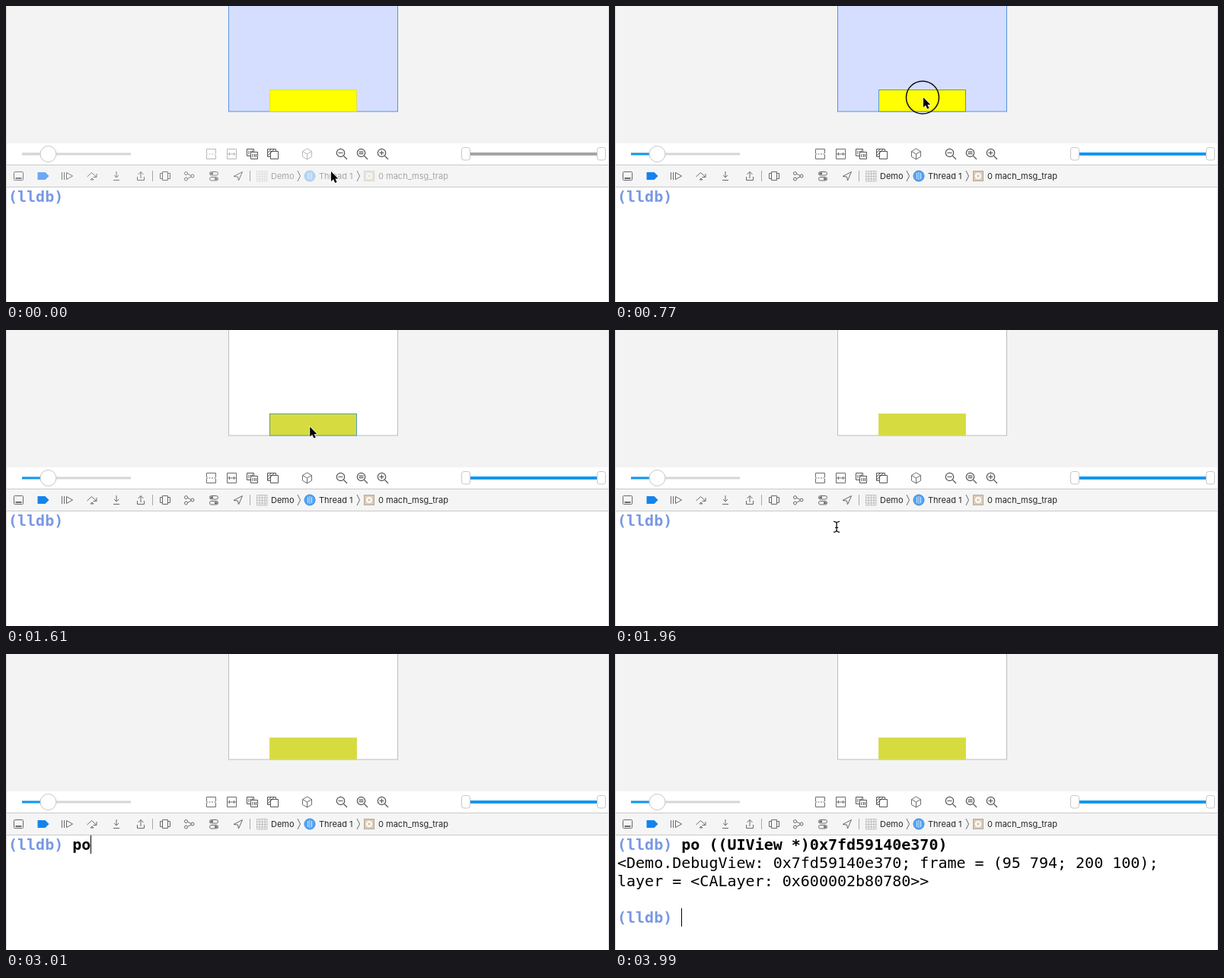
Animation of 792 by 390 pixels, one loop 4270 ms. Source, as an HTML page:

```html
<!DOCTYPE html>
<html lang="en">
<head>
<meta charset="utf-8">
<title>View debugger</title>
<style>
html, body { margin: 0; width: 100%; height: 100%; overflow: hidden; background: #fff; }
svg { display: block; --icon: #828282; --soft: #b8b8b8; --label: #a6a6a6; --tag: #6ea8f5; --fill: #d6d6d6; --range: #a4a4a4; --fade: .4; }
svg.active { --icon: #686868; --soft: #6c6c6c; --label: #272727; --tag: #1583ee; --fill: #1497ee; --range: #1497ee; --fade: 1; }
.icon { fill: none; stroke: var(--icon); }
.soft { fill: none; stroke: var(--soft); }
.dark { fill: none; stroke: #555; }
.knob { fill: #fff; stroke: #c6c6c6; }
.label { font: 11px Inter, sans-serif; fill: var(--label); }
.console { font: 20px "DejaVu Sans Mono", monospace; white-space: pre; }
.bold { font-weight: bold; }
.prompt { fill: #7898e4; font-weight: bold; }
</style>
</head>
<body>
<svg id="stage" width="792" height="390" viewBox="0 0 792 390">
  <rect width="792" height="181" fill="#f3f3f3"/>
  <rect id="screen" x="292.5" y="-5" width="222" height="144"/>
  <rect id="view" x="346.5" y="110.5" width="114" height="28.5"/>

  <!-- canvas controls -->
  <path d="M21 195H164" stroke="#d6d6d6" stroke-width="3"/>
  <path d="M21 195H50" stroke="var(--fill)" stroke-width="3"/>
  <circle class="knob" cx="55.5" cy="195" r="10.5"/>
  <path d="M608 195H778" stroke="var(--range)" stroke-width="4"/>
  <rect class="knob" x="598.5" y="186.5" width="11" height="16.5" rx="3"/>
  <rect class="knob" x="776.5" y="186.5" width="11" height="16.5" rx="3"/>
  <g class="soft">
    <path d="M263.5 194V188.5H275.5V194M263.5 196V201.500H275.5V196"/>
    <path d="M263 195H276" stroke-dasharray="2 1.5"/>
    <path d="M290.5 188.500H302.500V201.500H290.500ZM291 195H302M293.500 193V197M299.500 193V197"/>
    <path d="M395.500 188L401.500 191.500V198.500L395.500 202L389.500 198.500V191.500ZM389.500 191.500L395.500 195L401.500 191.500M395.500 195V202"/>
  </g>
  <g class="dark">
    <path d="M321 197.500H316.500V188.500H325.500V192M319 191V195M321.500 191V195M323.500 190V192"/>
    <path d="M321.500 192.500H330.500V201.500H321.500ZM324 195V199M326.500 195V199M328.500 195V199"/>
    <path d="M347.500 191.500H357.500V201.500H347.500ZM347 198.500H343.500V188.500H354.500V191M344 193L348 189M344 197L352 189"/>
    <g id="lenses" stroke-width="1.2"></g>
  </g>

  <!-- debug bar -->
  <rect y="209" width="792" height="30" fill="#c9c9c9"/>
  <rect y="210" width="792" height="28" fill="#f5f5f5"/>
  <path d="M192.500 217V231M320.500 217V231" stroke="#a8a8a8"/>
  <path d="M41.500 219H51.500L56.500 224L51.500 229H41.500Z" fill="var(--tag)"/>
  <g class="icon">
    <rect x="10.500" y="218.500" width="12" height="11" rx="1"/>
    <path d="M12.500 227H20.500" stroke-width="2"/>
    <path d="M73.500 219V229M76.500 219V229M79.500 219.500V228.500L87.500 224Z"/>
    <path d="M106.500 225L112.500 219.500L118.500 225M119 221V225.500H114.500M111 229L113 227L115 229Z"/>
    <path d="M145 218V226M142 223L145 226L148 223M141 229.500H149"/>
    <path d="M177 227V218.500M173.500 222L177 218.500L180.500 222M172.500 225V229.500H181.500V225"/>
    <path d="M205.500 218.500H212.500V229.500H205.500ZM205 220.500H202.500V227.500H205M213 220.500H215.500V227.500H213"/>
    <circle cx="236.500" cy="220.500" r="2"/><circle cx="245" cy="224" r="2"/><circle cx="236.500" cy="228" r="2"/>
    <path d="M238.500 221L243 223.500M238.500 227.500L243 225"/>
    <rect x="267.500" y="218.500" width="11" height="4.500" rx="2.200"/>
    <rect x="267.500" y="225.500" width="11" height="4.500" rx="2.200"/>
    <path d="M268.500 220.750H272M274 227.750H277.500" stroke-width="2.500"/>
    <path d="M299 224.500L310.500 218.500L305.500 230L304.500 225Z"/>
    <path d="M383 217L386.500 224L383 231M461 217L464.500 224L461 231"/>
  </g>
  <g opacity="var(--fade)" style="opacity:var(--fade)">
    <path d="M329.500 217.500H343V231H329.500ZM333 217V231M336.500 217V231M340 217V231M329 221H343M329 224.500H343M329 228H343" fill="#f1f1f1" stroke="#b9b9b9" stroke-width=".8"/>
    <circle cx="399" cy="224" r="7" fill="#55a5f3" stroke="#3989df"/>
    <path d="M396.500 220V228M399 219V229M401.500 220V228" stroke="#cfe6ff"/>
    <rect x="470.500" y="217.500" width="13" height="13" fill="#dccbb8" stroke="#b8a796"/>
    <circle cx="477" cy="224" r="3" fill="none" stroke="#fff" stroke-width="2"/>
  </g>
  <text class="label" x="348" y="228">Demo</text>
  <text class="label" x="411" y="228">Thread 1</text>
  <text class="label" x="489" y="228">0 mach_msg_trap</text>

  <!-- console -->
  <g class="console">
    <text x="3" y="258"><tspan class="prompt">(lldb) </tspan><tspan class="bold" id="command"></tspan></text>
    <g id="output">
      <text x="3" y="282">&lt;Demo.DebugView: 0x7fd59140e370; frame = (95 794; 200 100);</text>
      <text x="3" y="306">    layer = &lt;CALayer: 0x600002b80780&gt;&gt;</text>
      <text x="3" y="354" class="prompt">(lldb)</text>
    </g>
  </g>
  <rect id="caret" width="1" height="24"/>
  <path d="M.5 0V390M791.500 0V390" stroke="#dcdcdc"/>

  <circle id="ring" fill="none" stroke="#111" stroke-width="1.500"/>
  <path id="arrow" d="M0 0V13L3 10.300L5.200 15L7.600 13.900L5.400 9.400H9.200Z" stroke="#fff" stroke-width="1.200" paint-order="stroke"/>
  <g id="beam" fill="none">
    <path id="beamShape" d="M-4 -7Q0 -7 0 -4Q0 -7 4 -7M0 -4V4M-4 7Q0 7 0 4Q0 7 4 7M-2 1H2" stroke="#fff" stroke-width="3"/>
    <use href="#beamShape" style="stroke:#111"/>
    <path d="M-4 -7Q0 -7 0 -4Q0 -7 4 -7M0 -4V4M-4 7Q0 7 0 4Q0 7 4 7M-2 1H2" stroke="#111" stroke-width="1.300"/>
  </g>
</svg>
<script>
const LOOP = 4270, STEP = 70, CHAR = 12.04;
const COMMAND = "po ((UIView *)0x7fd59140e370)";
const PATH = [[0, 427, 218], [350, 405, 137], [560, 405, 120.5], [1540, 405, 120.5], [2100, 270, 285], [2170, 270.5, 287.5]];
const el = id => document.getElementById(id);
const set = (id, attrs) => { for (const k in attrs) el(id).setAttribute(k, attrs[k]); };
const show = (id, on) => set(id, { visibility: on ? "visible" : "hidden" });

el("beamShape").nextElementSibling.remove();
el("lenses").innerHTML = ["M-3 0H3", "M-3 -1.200H3M-3 1.200H3", "M-3 0H3M0 -3V3"].map((sign, i) =>
  `<g transform="translate(${439.5 + 27 * i} 193.500)"><circle r="5.200"/><path d="${sign}M4 4L8.500 8.500"/></g>`).join("");

function pointer(t) {
  const i = PATH.findIndex(p => p[0] > t);
  if (i < 0) return PATH.at(-1).slice(1);
  const [t0, x0, y0] = PATH[i - 1], [t1, x1, y1] = PATH[i];
  const u = (t - t0) / (t1 - t0), k = u * u * (3 - 2 * u);
  return [x0 + (x1 - x0) * k, y0 + (y1 - y0) * k];
}

function typed(t) {
  if (t >= 3220) return COMMAND.length;
  return t < 2800 ? 0 : t < 2940 ? 1 : t < 3080 ? 2 : 3;
}

function draw(t) {
  const [x, y] = pointer(t), picked = t >= 910, done = t >= 3920;
  el("stage").classList.toggle("active", t >= 700);
  set("screen", picked ? { fill: "#fff", stroke: "#bdbdbd" } : { fill: "#d5deff", stroke: "#5794dc" });
  set("view", { fill: picked ? "#d6dc3f" : "#ff0", stroke: y < 139 ? "#529bb8" : "#d9dc62" });

  const count = typed(t);
  el("command").textContent = COMMAND.slice(0, count);
  show("output", done);
  show("caret", t >= 2240);
  set("caret", {
    x: Math.round(3 + CHAR * (done ? 7 : 7 + count)),
    y: done ? 335 : 239,
    opacity: t >= 3430 && !done ? .75 : 1
  });

  const at = `translate(${x} ${y})`;
  set("arrow", { transform: at });
  set("beam", { transform: at });
  show("arrow", y < 239);
  show("beam", y >= 239 && t < 2800);

  const first = t >= 700 && t < 840, second = t >= 2170 && t < 2310;
  show("ring", first || second);
  set("ring", { cx: x - (first ? 1 : 0), cy: y, r: first ? (t < 770 ? 18 : 21.5) : (t < 2240 ? 14 : 17.5) });
}

const start = performance.now();
function tick() {
  const t = (performance.now() - start) % LOOP;
  draw(Math.floor(t / STEP) * STEP);
  requestAnimationFrame(tick);
}
tick();
</script>
</body>
</html>
```
